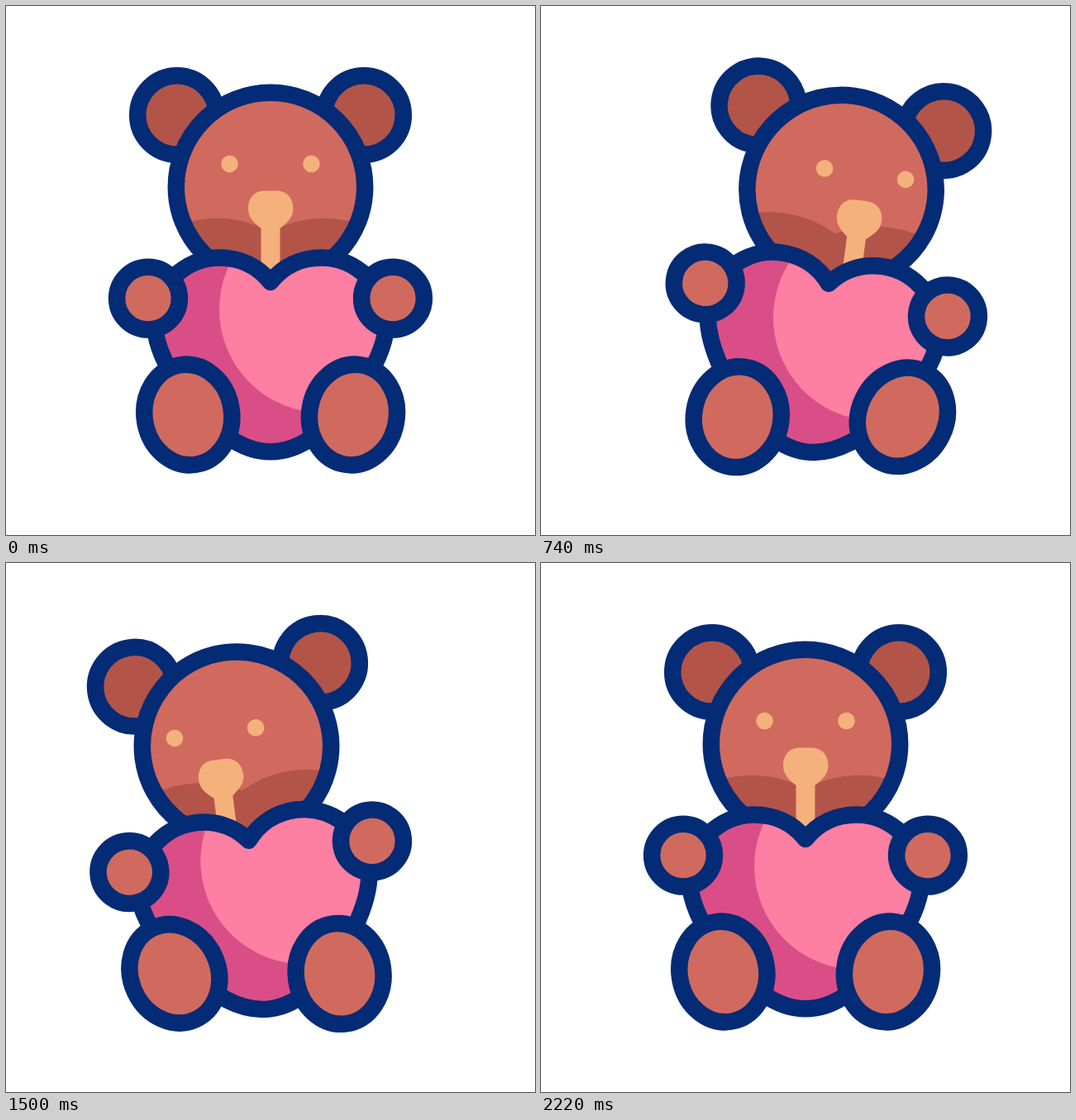
Write an HTML page that moves like this. It is 640 px wide and 640 px high and loops after 2.4 s.

```html
<!DOCTYPE html>
<html lang="en">
<head>
<meta charset="utf-8">
<title>Teddy bear with a heart</title>
<style>
  html, body { margin: 0; width: 100%; height: 100%; overflow: hidden; background: #fff; }
  svg { display: block; width: 100%; height: 100%; }
  .line { stroke: #042b76; stroke-width: 20.5; stroke-linejoin: round; }
  .fur { fill: #d16a5e; }
  .dark { fill: #b35449; }
  .tan { fill: #f5b17c; }
</style>
</head>
<body>
<svg viewBox="0 0 640 640">
  <defs>
    <path id="heartShape" d="M320 334C305 315 283 304.5 258 304.5C217 304.5 179.5 340 179.5 380
      C179.5 425 220 485 268 521C286 533.5 302 539.3 320 539.3
      C338 539.3 354 533.5 372 521C420 485 460.5 425 460.5 380
      C460.5 340 423 304.5 382 304.5C357 304.5 335 315 320 334Z"/>
    <clipPath id="inHead"><circle cx="320" cy="219" r="108"/></clipPath>
    <clipPath id="inHeart"><use href="#heartShape"/></clipPath>
  </defs>
  <g class="body">
    <circle class="line dark" cx="207" cy="132" r="47.8"/>
    <circle class="line dark" cx="433" cy="132" r="47.8"/>
    <circle class="fur" cx="320" cy="219" r="114.2"/>
    <g clip-path="url(#inHead)">
      <path class="dark beat" d="M200 268Q262 243 320 273Q378 243 440 268V360H200Z"/>
      <g id="face" class="tan">
        <circle cx="270.5" cy="191" r="10.3"/>
        <circle cx="369.5" cy="191" r="10.3"/>
        <path d="M313 223.5H327C340 223.5 347.5 233 347.5 245C347.5 256 340 262 331.5 269V335
          H308.5V269C300 262 293 256 293 245C293 233 300 223.5 313 223.5Z"/>
      </g>
    </g>
    <circle class="line" fill="none" cx="320" cy="219" r="114.2"/>
    <g class="beat">
      <use href="#heartShape" fill="#da4e87"/>
      <g clip-path="url(#inHeart)"><circle cx="383" cy="367" r="125" fill="#fd7fa1"/></g>
      <use href="#heartShape" class="line" fill="none"/>
    </g>
  </g>
  <g class="line fur">
    <ellipse class="foot" rx="52.8" ry="61"/>
    <ellipse class="foot" rx="52.8" ry="61"/>
    <g class="body">
      <circle cx="172" cy="353.7" r="37.9"/>
      <circle cx="468" cy="353.7" r="37.9"/>
    </g>
  </g>
</svg>
<script>
const LOOP = 2400, STEP = 20;
const all = s => [...document.querySelectorAll(s)];
const bodies = all('.body'), beats = all('.beat'), feet = all('.foot');
const face = document.getElementById('face');
const put = (el, value) => el.setAttribute('transform', value);

// Eased value at time t through [time, value] keys
function track(t, keys) {
  if (t <= keys[0][0]) return keys[0][1];
  for (let i = 1; i < keys.length; i++) {
    const [t0, a] = keys[i - 1], [t1, b] = keys[i];
    if (t < t1) {
      const u = (t - t0) / (t1 - t0);
      return a + (b - a) * u * u * (3 - 2 * u);
    }
  }
  return keys[keys.length - 1][1];
}

const sway = (t, right, left) => track(t, [[200, 0], [800, right], [1600, left], [2200, 0]]);
const beatKeys = [200, 970, 1740].flatMap(s => [[s, 1], [s + 270, 1.074], [s + 480, 1]]);

function draw(t) {
  const tilt = sway(t, 8, -8), scale = track(t, beatKeys);
  bodies.forEach(el => put(el, `rotate(${tilt} 320 541)`));
  beats.forEach(el => put(el, `translate(320 421) scale(${scale}) translate(-320 -421)`));
  put(face, `translate(${sway(t, 26.5, -26)} ${sway(t, 5.7, 9)})`);
  // Each foot rocks on a point near its heel
  feet.forEach((el, i) => {
    const x = i ? 420 : 220.3, lean = i ? 9 : -9;
    put(el, `rotate(${tilt * 2.25} ${x} 552.5) translate(${x} 494.5) rotate(${lean})`);
  });
}

function tick() {
  draw(Math.floor(performance.now() % LOOP / STEP) * STEP);
  requestAnimationFrame(tick);
}
tick();
</script>
</body>
</html>
```
